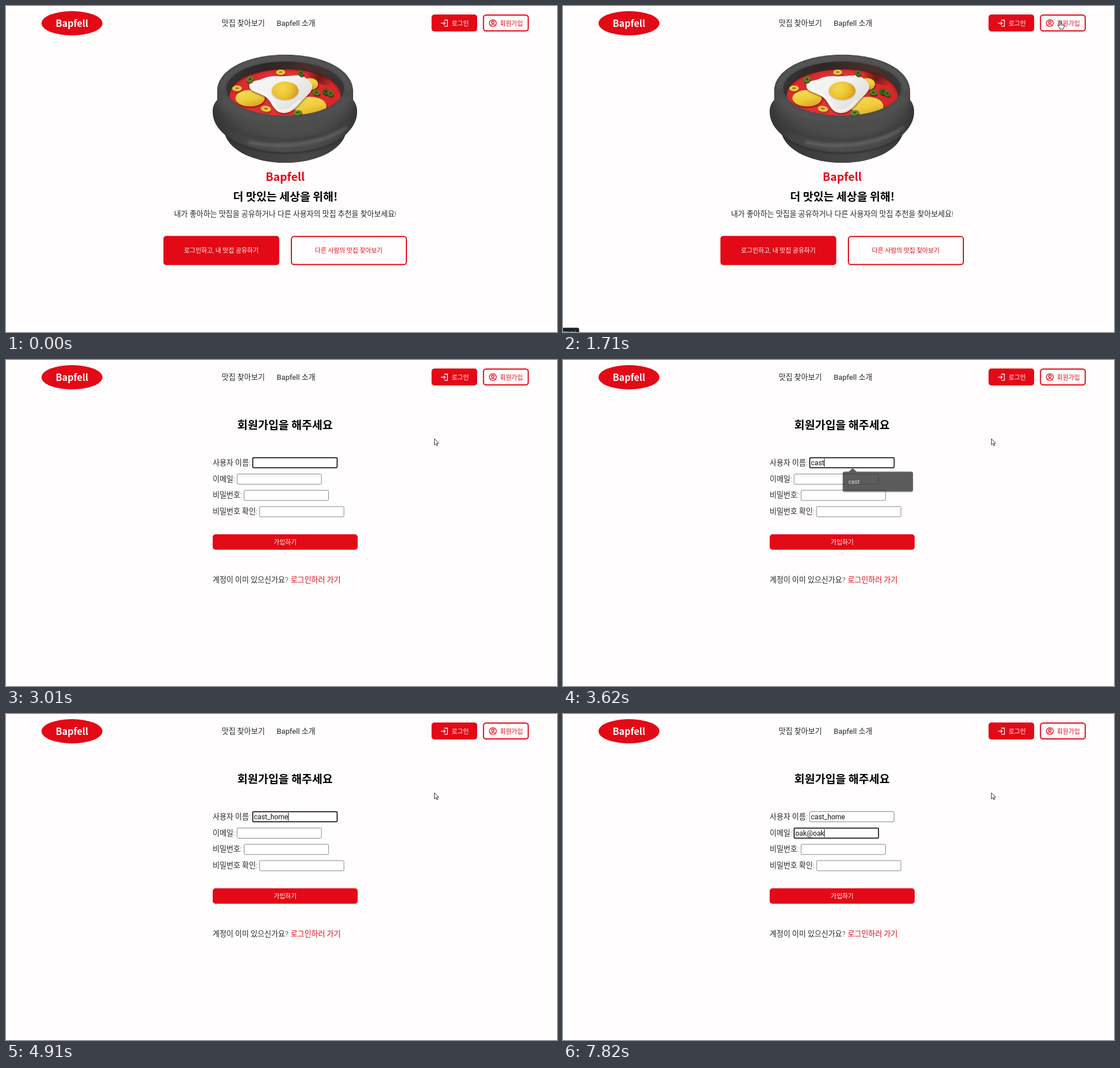
Write an HTML page with a canvas that moves like this. It is 973 by 576 pixels and loops after 8000 ms.

```html
<!DOCTYPE html>
<html lang="ko">
<head>
<meta charset="utf-8">
<title>Bapfell</title>
<style>
html, body { margin: 0; width: 100%; height: 100%; overflow: hidden; background: #fffdfd; }
canvas { display: block; }
</style>
</head>
<body>
<canvas id="stage" width="973" height="576"></canvas>
<script>
const W = 973, H = 576, LOOP = 8000;
const RED = '#e30916', BG = '#fffdfd', INK = '#262626';
const SANS = "Roboto, 'Noto Sans CJK KR', 'Noto Sans CJK', sans-serif";
const CJK = "'Noto Sans CJK KR', 'Noto Sans CJK', sans-serif";
const BRAND = 'Bapfell', USER = 'cast_home', MAIL = 'oak@oak';
const USER_KEYS = [3280, 3350, 3480, 3620, 4110, 4500, 4630, 4770, 4910];
const MAIL_KEYS = [6100, 6230, 6570, 7110, 7360, 7550, 7820];
const PAGE_SWITCH = 1780, FOCUS_MAIL = 5440;

const stage = document.getElementById('stage');
let ctx = stage.getContext('2d');

const clamp = v => Math.max(0, Math.min(1, v));
const span = (t, a, b) => clamp((t - a) / (b - a));
const easeOut = p => 1 - (1 - p) ** 2;
const easeInOut = p => p * p * (3 - 2 * p);
const typed = (text, keys, t) => text.slice(0, keys.filter(k => t >= k).length);

function text(str, x, y, size, color = INK, align = 'left', weight = 350, family = SANS) {
  ctx.font = `${weight} ${size}px ${family}`;
  ctx.textAlign = align;
  ctx.fillStyle = color;
  ctx.fillText(str, x, y);
}

function box(x, y, w, h, r, fill, stroke, line = 1) {
  ctx.beginPath();
  ctx.roundRect(x, y, w, h, r);
  if (fill) { ctx.fillStyle = fill; ctx.fill(); }
  if (stroke) { ctx.strokeStyle = stroke; ctx.lineWidth = line; ctx.stroke(); }
}

function oval(x, y, rx, ry, fill, rot = 0) {
  ctx.beginPath();
  ctx.ellipse(x, y, rx, ry, rot, 0, Math.PI * 2);
  ctx.fillStyle = fill;
  ctx.fill();
}

function ramp(x0, y0, x1, y1, ...colors) {
  const g = ctx.createLinearGradient(x0, y0, x1, y1);
  colors.forEach((c, i) => g.addColorStop(i / (colors.length - 1), c));
  return g;
}

function glow(x, y, r, ...colors) {
  const g = ctx.createRadialGradient(x, y, 0, x, y, r);
  colors.forEach((c, i) => g.addColorStop(i / (colors.length - 1), c));
  return g;
}

function shape(d, fill, stroke, line) {
  const p = new Path2D(d);
  if (fill) { ctx.fillStyle = fill; ctx.fill(p); }
  if (stroke) { ctx.strokeStyle = stroke; ctx.lineWidth = line; ctx.stroke(p); }
}

function soft(d, color, line, blur) {
  ctx.save();
  ctx.filter = `blur(${blur}px)`;
  ctx.lineCap = 'round';
  shape(d, null, color, line);
  ctx.restore();
}

function ring(x, y, rx, ry, rot, light, dark) {
  oval(x + 1, y + 2.5, rx, ry, 'rgba(90,0,0,.4)', rot);
  oval(x, y + 1, rx, ry, dark, rot);
  oval(x, y - 0.6, rx, ry, light, rot);
  oval(x, y - 0.8, rx * 0.4, ry * 0.34, dark, rot);
}

function dome(x, y, rx, ry) {
  oval(x + 1, y + 2, rx + 1, ry + 1, 'rgba(120,0,0,.45)');
  oval(x, y, rx, ry, ramp(x, y - ry, x + rx * .3, y + ry, '#f3da50', '#efcc3a', '#dba41f'));
}

function paintBowl() {
  const outline = 'M373 150C374 112 426 86 493 86C560 86 612 112 613 150L613 166C618 172 620 179 620 187' +
    'C620 203 612 216 599 228C590 255 548 277 493 277C438 277 396 255 387 228' +
    'C373 216 365 203 365 187C365 179 367 172 373 166Z';
  shape(outline, ramp(365, 0, 620, 0, '#3a3a3a', '#464646', '#4c4c4c', '#494949', '#3c3c3c'));
  ctx.save();
  ctx.clip(new Path2D(outline));
  shape('M387 228C412 250 452 260 493 260C535 260 575 250 599 228L599 280L387 280Z',
    ramp(387, 0, 599, 0, '#353535', '#414141', '#484848', '#383838'));
  soft('M386 228C412 250 452 260 493 260C535 260 575 250 601 228', '#303030', 2.5, 1.2);
  soft('M368 180C384 221 436 237 493 237C550 237 602 221 617 180', '#3d3d3d', 5, 3);
  soft('M430 241C470 250 545 251 602 215', '#6c6c6c', 4, 2.5);
  soft('M377 158C390 198 436 214 493 214C550 214 596 198 609 158', '#4e4e4e', 15, 7);
  soft('M365 180C368 200 376 213 390 226M620 180C617 200 610 214 597 226', '#333', 5, 4);
  oval(493, 147, 120, 61, ramp(373, 86, 613, 208, '#464646', '#4f4f4f', '#484848', '#4c4c4c'));
  soft('M381 146C385 113 435 92 493 92C551 92 601 113 605 146', '#5c5c5c', 5, 3);
  soft('M386 165C404 190 450 202 493 202C540 202 584 189 601 163', '#545454', 8, 4);
  ctx.restore();

  // Opening and broth
  ctx.save();
  ctx.beginPath();
  ctx.ellipse(493, 146, 104, 48, 0, 0, Math.PI * 2);
  ctx.clip();
  oval(493, 146, 105, 49, ramp(389, 98, 597, 150, '#363636', '#2b2726', '#46302b', '#363636'));
  oval(493, 158, 98, 46, ramp(400, 112, 570, 195, '#d32a2b', '#e33335', '#d42729'));
  soft('M396 151C405 126 445 112 493 112C540 112 580 126 590 152', 'rgba(130,10,10,.5)', 3, 2);
  oval(553, 128, 25, 8, glow(553, 128, 25, 'rgba(65,20,13,.75)', 'rgba(65,20,13,0)'), .45);

  dome(431, 163, 26, 14.5);
  dome(537, 177, 29, 16.5);
  dome(537, 138, 14, 10.5);

  const egg = 'M430 140C428 132 442 133 452 129C466 122 479 124 492 124C504 124 517 120 526 125' +
    'C532 129 540 133 541 142C541 151 532 158 524 166C517 174 511 182 503 186' +
    'C496 190 487 190 481 187C472 182 470 173 463 165C457 157 445 155 436 150C431 148 429 144 430 140Z';
  ctx.save();
  ctx.shadowColor = 'rgba(90,0,0,.55)';
  ctx.shadowBlur = 3;
  ctx.shadowOffsetY = 2;
  shape(egg, ramp(450, 124, 510, 190, '#f6f5f5', '#f1f0ef', '#dedddc'));
  ctx.restore();
  soft('M437 148C452 153 462 157 470 168C476 178 479 185 489 185C504 184 511 174 518 167', '#fff', 2, 1);
  oval(493, 151, 24.5, 16.5, 'rgba(170,150,120,.4)');
  oval(493, 149.5, 23.5, 16, glow(487, 144, 32, '#f3d650', '#edc634', '#d2941a'));

  ring(408, 146, 8.5, 4.8, 0, '#ebc944', '#a97716');
  ring(485, 117.5, 8, 4.5, 0, '#ebc944', '#a97716');
  ring(459, 182, 9, 5, .15, '#ebc944', '#a97716');
  ring(431, 130, 6.5, 5, -.6, '#5f8129', '#2f4c13');
  ring(521, 119, 5.5, 4.5, .9, '#4d7022', '#29460f');
  ring(548, 153.5, 7, 4.5, .15, '#557c28', '#29480f');
  ring(565, 152, 6.5, 5, .5, '#3f611d', '#223c0c');
  ring(573, 155, 5.5, 5, .7, '#4d7126', '#29480f');
  ring(515, 189, 8, 4.5, -.1, '#66892d', '#385919');
  ctx.restore();
}

const bowl = document.createElement('canvas');
bowl.width = W;
bowl.height = H;
const main = ctx;
ctx = bowl.getContext('2d');
paintBowl();
ctx = main;

function header() {
  oval(116.5, 30.5, 53.8, 21.5, RED);
  text(BRAND, 116.5, 37, 16.5, '#fff', 'center', 700, CJK);
  text('맛집 찾아보기', 381, 35, 13.2);
  text(BRAND + ' 소개', 478, 35, 13.2, INK, 'left', 400);

  box(751.5, 15, 80.5, 30, 5, RED);
  shape('M774 25h5.5v10.8h-5.5M768 30.4h7.5M772.8 27.6l2.8 2.8l-2.8 2.8', null, '#fff', 1.3);
  text('로그인', 787, 34.5, 11, '#fff');

  box(843.2, 16, 79, 28, 4.5, null, RED, 2);
  ctx.beginPath();
  ctx.arc(859.7, 30.3, 6.1, 0, Math.PI * 2);
  ctx.moveTo(861.9, 28.7);
  ctx.arc(859.7, 28.7, 2.2, 0, Math.PI * 2);
  ctx.moveTo(855.5, 34.3);
  ctx.quadraticCurveTo(859.7, 31, 863.9, 34.3);
  ctx.strokeStyle = RED;
  ctx.lineWidth = 1.3;
  ctx.stroke();
  text('회원가입', 872.3, 34.5, 11, RED);
}

function home() {
  ctx.drawImage(bowl, 0, 0);
  text(BRAND, 493, 309, 19.8, RED, 'center', 700, CJK);
  text('더 맛있는 세상을 위해!', 493.3, 344.3, 19.8, '#000', 'center', 700, CJK);
  text('내가 좋아하는 맛집을 공유하거나 다른 사용자의 맛집 추천을 찾아보세요!', 493, 372, 13.2, INK, 'center');
  box(278, 406.3, 204.5, 51.5, 5, RED);
  text('로그인하고, 내 맛집 공유하기', 380.2, 436.2, 11, '#fff', 'center');
  box(504, 407.3, 203, 49.5, 4.5, null, RED, 2);
  text('다른 사람의 맛집 찾아보기', 605.3, 436.2, 11, RED, 'center');
}

function field(label, x, y, value, focus, caret) {
  text(label, 365, y + 13.5, 13.2);
  if (focus) box(x + .7, y + .7, 149, 17.6, 1.5, '#fff', '#101010', 1.7);
  else box(x + .5, y + .5, 149, 18, 1.5, '#fff', '#858585', 1);
  text(value, x + 2.7, y + 14, 12.375, '#111', 'left', 400);
  if (caret) {
    ctx.fillStyle = '#111';
    ctx.fillRect(Math.round(x + 2.7 + ctx.measureText(value).width), y + 2.5, 1, 14);
  }
}

function signup(t) {
  text('회원가입을 해주세요', 492.7, 121.5, 19.8, '#000', 'center', 700, CJK);
  const onMail = t >= FOCUS_MAIL;
  const caretOff = (t >= 2250 && t < 2670) || (t >= 3010 && t < 3280) || (t >= 6030 && t < 6100);
  field('사용자 이름:', 435, 172, typed(USER, USER_KEYS, t), !onMail, !onMail && !caretOff);
  field('이메일:', 407.5, 201, typed(MAIL, MAIL_KEYS, t), onMail, onMail && !caretOff);
  field('비밀번호:', 420, 229.7, '');
  field('비밀번호 확인:', 447.3, 258.5, '');
  box(365, 308, 256, 27.3, 5, RED);
  text('가입하기', 493, 326, 11, '#fff', 'center');
  ctx.fillStyle = '#aaa';
  ctx.fillRect(492, 341, 1.5, 1);
  text('계정이 이미 있으신가요?', 365, 392.6, 13.2);
  text('로그인하러 가기', 502.7, 392.6, 13.2, RED);
}

function suggestion(t) {
  const alpha = span(t, 3300, 3420) * (1 - span(t, 3570, 3800));
  if (t < 3350 || alpha <= 0) return;
  ctx.save();
  ctx.globalAlpha = alpha;
  ctx.shadowColor = 'rgba(0,0,0,.25)';
  ctx.shadowBlur = 3;
  ctx.shadowOffsetY = 1.5;
  shape('M504.5 197.3L511.5 191L518.5 197.3H615Q618 197.3 618 200.3V229.5Q618 232.5 615 232.5H497' +
    'Q494 232.5 494 229.5V200.3Q494 197.3 497 197.3Z', '#3c3c3c');
  ctx.restore();
  ctx.save();
  ctx.globalAlpha = alpha;
  text(USER.slice(0, 4), 504, 218.8, 10.2, '#fff', 'left', 400);
  ctx.restore();
}

function status(t) {
  if (t < 1300 || t >= 2530) return;
  box(-6, 568.5, 34.5, 14, 3, '#202124');
  text('signup/', 23, 579.5, 9, '#e8eaed', 'right', 400);
}

function pointerAt(t) {
  const mix = (a, b, p) => a + (b - a) * p;
  if (t < 2190) {
    const p = easeOut(span(t, 740, 1540));
    return [mix(975, 878, p), mix(96, 26, p)];
  }
  if (t < 2740) {
    const p = easeInOut(span(t, 2150, 2670));
    return [mix(878, 760, p), mix(26, 141, p)];
  }
  const p = span(t, 2740, 3010);
  return [mix(760, 756.5, p), mix(141, 139, p)];
}

function pointer(t) {
  if (t < 790) return;
  const [x, y] = pointerAt(t);
  const over = x > 842 && x < 924 && y > 14 && y < 46;
  ctx.save();
  ctx.translate(x, y);
  ctx.lineJoin = 'round';
  if (over) {
    shape('M-1.2 1Q0 -.8 1.2 1V6Q2.5 4.9 3.4 6.3Q4.6 5.3 5.4 6.8Q6.8 6.1 7 7.8V10.5Q6.8 12.5 5.5 13.3V15H-.6V13.4' +
      'L-3.8 9.5Q-4.6 8 -3.4 7.6Q-2.2 7.5 -1.2 9Z', '#fff', '#222', 1);
    shape('M1.2 6V9M3.4 6.5V9M5.4 7V9', null, '#222', .7);
  } else {
    shape('M0 0V11L2.5 8.7L4.3 12.7L5.9 12L4.2 8.2H7.6Z', '#fff', '#222', .9);
  }
  ctx.restore();
}

function draw(t) {
  ctx.fillStyle = BG;
  ctx.fillRect(0, 0, W, H);
  header();
  if (t < PAGE_SWITCH) home();
  else signup(t);
  suggestion(t);
  status(t);
  pointer(t);
}

const start = performance.now();
function tick() {
  draw((performance.now() - start) % LOOP);
  requestAnimationFrame(tick);
}
tick();
</script>
</body>
</html>
```
